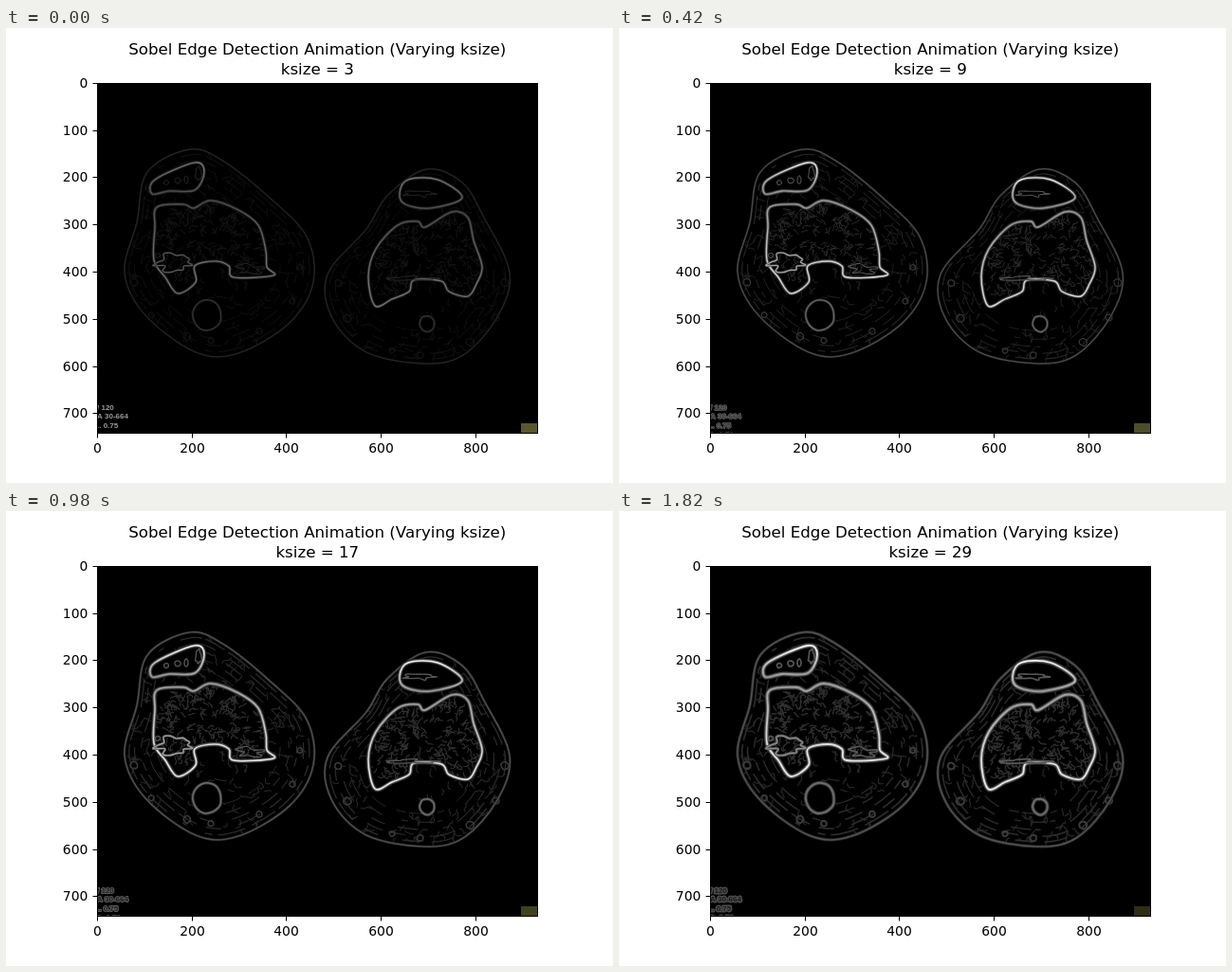
Recreate the animation shown at these times as an HTML page with a canvas. Size 640 by 480 pixels, loop 1.96 s.

```html
<!DOCTYPE html>
<html lang="en">
<head>
<meta charset="utf-8">
<title>Sobel Edge Detection</title>
<style>
  html, body { margin: 0; width: 100%; height: 100%; overflow: hidden; background: #fff; }
  canvas, svg { position: absolute; left: 0; top: 0; }
  text { font: 13.89px "DejaVu Sans", sans-serif; }
  .title text { font-size: 16.67px; text-anchor: middle; }
</style>
</head>
<body>
<canvas id="scan" width="640" height="480"></canvas>
<svg id="axes" width="640" height="480">
  <rect x="96.5" y="58.5" width="464" height="369" fill="none" stroke="#000"/>
  <g class="title">
    <text x="328.3" y="28">Sobel Edge Detection Animation (Varying ksize)</text>
    <text x="328.3" y="49" id="label"></text>
  </g>
</svg>
<script>
const STEP = 140, COUNT = 14, SCALE = 0.498;
const ctx = document.getElementById('scan').getContext('2d');
const label = document.getElementById('label');

let seed = 7;
const rand = (lo = 0, hi = 1) => lo + (hi - lo) * (seed = seed * 16807 % 2147483647) / 2147483647;

// Axis ticks, snapped to whole pixels
let ticks = '';
for (let v = 0; v <= 800; v += 100) {
  const x = Math.round(96.2 + v * SCALE), y = Math.round(57.85 + v * SCALE);
  if (v % 200 === 0) ticks += `<path d="M${x + 0.5} 428v4.5" stroke="#000"/>
    <text x="${x + 0.5}" y="448" text-anchor="middle">${v}</text>`;
  if (v < 800) ticks += `<path d="M96 ${y + 0.5}h-4.5" stroke="#000"/>
    <text x="86.3" y="${y + 5}" text-anchor="end">${v}</text>`;
}
document.getElementById('axes').insertAdjacentHTML('beforeend', ticks);

// Smooth closed curve through key points
function curve(p) {
  const n = p.length, path = new Path2D(), at = i => p[(i + n) % n];
  path.moveTo(...p[0]);
  p.forEach((b, i) => {
    const a = at(i - 1), c = at(i + 1), d = at(i + 2);
    path.bezierCurveTo(b[0] + (c[0] - a[0]) / 6, b[1] + (c[1] - a[1]) / 6,
      c[0] - (d[0] - b[0]) / 6, c[1] - (d[1] - b[1]) / 6, ...c);
  });
  return path;
}
const outline = text => curve(text.split(' ').map(s => s.split(',').map(Number)));

// Ellipse with a randomly ragged edge
function blob(x, y, rx, ry = rx, rough = 0.08, n = 14) {
  return curve(Array.from({ length: n }, (_, i) => {
    const a = i / n * 2 * Math.PI, k = 1 + rand(-rough, rough);
    return [x + Math.cos(a) * rx * k, y + Math.sin(a) * ry * k];
  }));
}

// Short random wriggles spread over an ellipse
function wriggles(x, y, rx, ry, count, step) {
  const path = new Path2D();
  while (count--) {
    let a = rand(0, 6.28), r = Math.sqrt(rand());
    let px = x + Math.cos(a) * r * rx, py = y + Math.sin(a) * r * ry;
    path.moveTo(px, py);
    for (let n = rand(2, 5); n > 0; n--) {
      a += rand(-1.2, 1.2);
      path.lineTo(px += Math.cos(a) * step, py += Math.sin(a) * step);
    }
  }
  return path;
}

function limb(x, y, skin, bone, patella, canal) {
  return {
    x, y, canal,
    skin: outline(skin), bone: outline(bone), patella: outline(patella),
    marrow: wriggles(x, y - 12, 64, 46, 330, 1.8),
    tissue: wriggles(x, y + 5, 96, 108, 190, 2.4),
    layers: [0.95, 0.89, 0.82, 0.74, 0.65].map(size =>
      ({ size, dash: Array.from({ length: 16 }, () => rand(4, 32)) })),
    vessels: Array.from({ length: 7 }, (_, i) => {
      const a = i * 0.5 + rand(-0.1, 0.2);
      return blob(x + Math.cos(a) * 88, y + 18 + Math.sin(a) * 72, rand(2.5, 4));
    })
  };
}

const limbs = [
  limb(222, 240,
    '194,128 230,141 279,180 317,220 324,268 299,311 245,343 200,342 147,303 125,258 138,205 149,152',
    '159,189 187,186 198,190 216,182 245,192 266,208 274,235 275,252 282,261 240,263 235,251 220,246 199,251 200,268 181,280 168,263 156,245 157,210',
    '154,175 157,160 199,142 209,152 199,171 172,172',
    blob(212, 303, 15, 16, 0.03)),
  limb(438, 255,
    '443,149 481,163 504,200 531,258 518,305 482,345 440,354 380,342 344,306 339,260 380,212 402,177',
    '389,293 382,262 390,233 413,208 434,204 442,210 470,194 487,200 493,224 502,252 496,270 487,283 467,278 459,267 430,266 425,278 407,286',
    '415,174 424,160 455,160 481,179 448,190 421,186',
    blob(444, 312, 8, 8.5, 0.05))
];

const fringe = blob(177, 247, 17, 8, 0.4, 18);
const spots = [blob(169, 163, 2.5), blob(181, 161, 3), blob(190, 160, 2, 4), blob(203, 154, 3, 7, 0.3),
  blob(160, 240, 2.5), blob(437, 175, 16, 2.5, 0.5), blob(258, 254, 13, 4, 0.5), blob(425, 264, 25, 1.5, 0.6)];

const gray = level => {
  const c = Math.round(255 * Math.min(1, level));
  return `rgb(${c},${c},${c})`;
};

function stroke(path, level, width) {
  ctx.strokeStyle = gray(level);
  ctx.lineWidth = width;
  ctx.stroke(path);
}

// Soft halo with a core whose brightness runs from top to bottom
function edge(path, top, bottom, y, height, gain, wide) {
  stroke(path, 0.13 * gain, 4 + wide * 1.6);
  stroke(path, 0.34 * gain, 2.5 + wide * 1.4);
  const core = ctx.createLinearGradient(0, y, 0, y + height);
  core.addColorStop(0, gray(top * gain));
  core.addColorStop(1, gray(bottom * gain));
  ctx.strokeStyle = core;
  ctx.lineWidth = 1.2 + wide * 0.6;
  ctx.stroke(path);
}

function drawLimb(l, gain, wide) {
  const thin = 0.9 + wide * 0.4;
  ctx.save();
  ctx.clip(l.skin);
  stroke(l.tissue, 0.15 * gain, thin);
  l.layers.forEach(({ size, dash }) => {
    ctx.save();
    ctx.translate(l.x * (1 - size), l.y * (1 - size));
    ctx.scale(size, size);
    ctx.setLineDash(dash);
    stroke(l.skin, 0.17 * gain, thin + wide * 0.5);
    ctx.restore();
  });
  ctx.fillStyle = '#000';
  [l.bone, l.patella, l.canal].forEach(p => ctx.fill(p));
  ctx.clip(l.bone);
  stroke(l.marrow, 0.19 * gain, thin);
  ctx.restore();

  l.vessels.forEach(v => stroke(v, 0.23 * gain, 1 + wide));
  stroke(l.skin, 0.15 * gain, 1.8 + wide * 1.4);
  stroke(l.skin, 0.32 * gain, 0.9 + wide * 0.6);
  stroke(l.canal, 0.2 * gain, 2.4 + wide * 1.6);
  stroke(l.canal, 0.42 * gain, 1 + wide);
  edge(l.bone, 0.62, 0.9, l.y - 55, 70, gain, wide);
  edge(l.patella, 0.95, 0.6, l.y - 95, 30, gain, wide);
}

function drawNotes(i, wide) {
  ctx.font = 'bold 8px "Liberation Sans", Arial, sans-serif';
  ['/ 120', 'A 30-664', '.. 0.75', '0: 0.50'].forEach((s, n) => {
    const y = 402.5 + n * 9.7;
    if (i) {
      ctx.strokeStyle = gray(0.42 - wide * 0.12);
      ctx.lineWidth = 1 + wide * 2;
      ctx.strokeText(s, 96, y);
    }
    ctx.fillStyle = gray(0.1 + 0.5 * Math.exp(-i / 2));
    ctx.fillText(s, 96, y);
  });
}

function draw(i) {
  const wide = i / (COUNT - 1), gain = 1 - 0.5 * Math.exp(-0.7 * i);
  label.textContent = 'ksize = ' + (3 + 2 * i);
  ctx.save();
  ctx.beginPath();
  ctx.rect(96, 58, 465, 370);
  ctx.clip();
  ctx.fillStyle = '#000';
  ctx.fillRect(96, 58, 465, 370);
  ctx.lineJoin = ctx.lineCap = 'round';

  limbs.forEach(l => drawLimb(l, gain, wide));
  spots.forEach(p => stroke(p, 0.34 * gain, 0.9 + wide * 0.8));
  stroke(fringe, 0.3 * gain, 2 + wide);
  stroke(fringe, (0.75 - wide * 0.2) * gain, 1 + wide * 0.3);

  drawNotes(i, wide);
  const tone = 88 - wide * 42;
  ctx.fillStyle = `rgb(${tone},${tone},${tone / 2})`;
  ctx.fillRect(543, 417, 18, 18);
  ctx.restore();
}

let shown = -1;
function tick(now) {
  const i = Math.floor(now % (STEP * COUNT) / STEP);
  if (i !== shown) draw(shown = i);
  requestAnimationFrame(tick);
}
tick(0);
</script>
</body>
</html>
```
